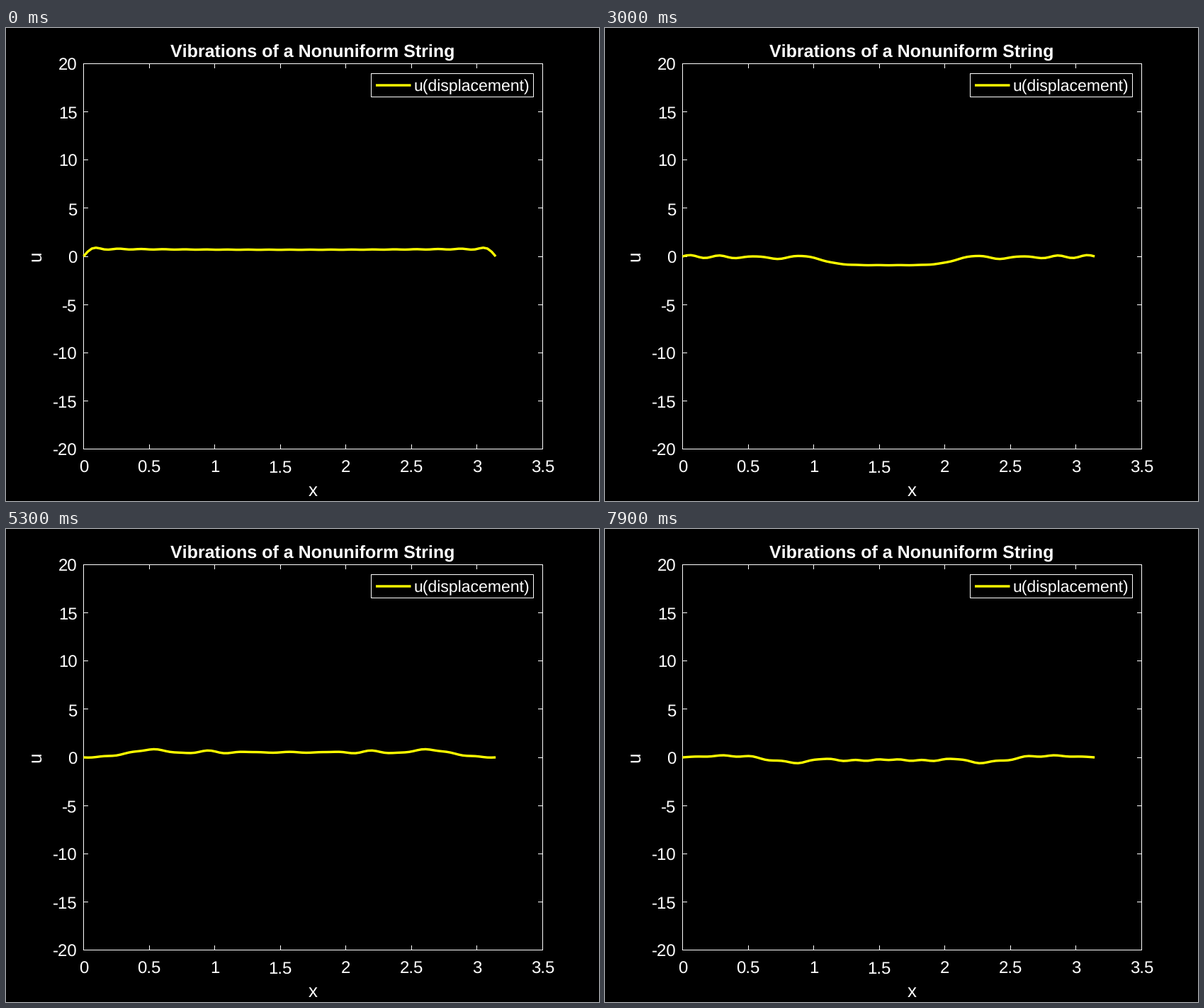
Recreate the animation shown at these times as a matplotlib script. Size 837x669 px, loop 8 s.

```python
import numpy as np
import matplotlib.pyplot as plt
from matplotlib.animation import FuncAnimation

W, H, DPI = 837, 669, 64
PT = 72 / DPI  # points per pixel
FRAMES, INTERVAL = 80, 100
LEFT, RIGHT, TOP, BOTTOM = 109.5, 757.5, 50.5, 595.5
YELLOW = "#ffff00"

plt.rcParams.update({
    "font.family": "Liberation Sans",
    "text.hinting": "none",
    "text.hinting_factor": 1,
    "toolbar": "None",
})

fig = plt.figure(figsize=(W / DPI, H / DPI), dpi=DPI, facecolor="black")
ax = fig.add_axes([0, 0, 1, 1])
ax.set_xlim(0, W)
ax.set_ylim(H, 0)
ax.axis("off")


def px(x):
    return LEFT + x / 3.5 * (RIGHT - LEFT)


def py(u):
    return BOTTOM - (u + 20) / 40 * (BOTTOM - TOP)


def crisp(v):
    return np.floor(v) + 0.5


def line(xs, ys, color="white", width=1.0):
    return ax.plot(xs, ys, color=color, lw=width * PT, snap=False,
                   solid_capstyle="butt", solid_joinstyle="round")[0]


def box(x0, y0, x1, y1):
    ax.plot([x0, x1, x1, x0, x0], [y0, y0, y1, y1, y0], color="white",
            lw=PT, snap=False, solid_capstyle="projecting",
            solid_joinstyle="miter")


def label(x, y, text, size, ha="center", **style):
    ax.text(x, y, text, fontsize=size * PT, color="white", ha=ha,
            va="baseline", **style)


# Axes frame with inward ticks on all four sides
TICK = 6.5
box(LEFT, TOP, RIGHT, BOTTOM)
for v in np.arange(0, 3.6, 0.5):
    x = crisp(px(v))
    line([x, x], [BOTTOM, BOTTOM - TICK])
    line([x, x], [TOP, TOP + TICK])
    label(px(v), 628.5, f"{v:g}", 24)
for v in range(-20, 21, 5):
    y = crisp(py(v))
    line([LEFT, LEFT + TICK], [y, y])
    line([RIGHT, RIGHT - TICK], [y, y])
    label(100.5, py(v) + 9.5, str(v), 24, ha="right")

label(433, 41, "Vibrations of a Nonuniform String", 25, weight="bold")
label(433, 662, "x", 26.4)
label(49, 323, "u", 26.4, rotation=90, rotation_mode="anchor")

# Legend
box(515.5, 64.5, 744.5, 97.5)
line([522, 571.5], [81, 81], YELLOW, 3.4)
label(576, 88.8, "u(displacement)", 22.6, ha="left")

# String of 100 segments, heavier in the middle, as a sum of its lowest modes
SEGMENTS, MODES = 100, 37
STEP = 0.3838
x = np.linspace(0, np.pi, SEGMENTS + 1)
h = np.pi / SEGMENTS
root = np.sqrt(1 + 0.3 * np.sin(x[1:-1]))  # square root of the density
size = SEGMENTS - 1
stiff = (2 * np.eye(size) - np.eye(size, k=1) - np.eye(size, k=-1)) / h ** 2
values, vectors = np.linalg.eigh(stiff / np.outer(root, root))
omega = np.sqrt(values[:MODES])
vectors = vectors[:, :MODES]
amp = np.pi / 4 * vectors.sum(axis=0)
shapes = np.pad(vectors / root[:, None], ((1, 1), (0, 0)))

string = line(px(x), py(0 * x), YELLOW, 3.4)


def update(i):
    u = shapes @ (amp * np.cos(omega * STEP * i))
    string.set_ydata(py(u))
    return string,


anim = FuncAnimation(fig, update, frames=FRAMES, interval=INTERVAL,
                     repeat=True, repeat_delay=0, blit=False)
plt.show()
```
